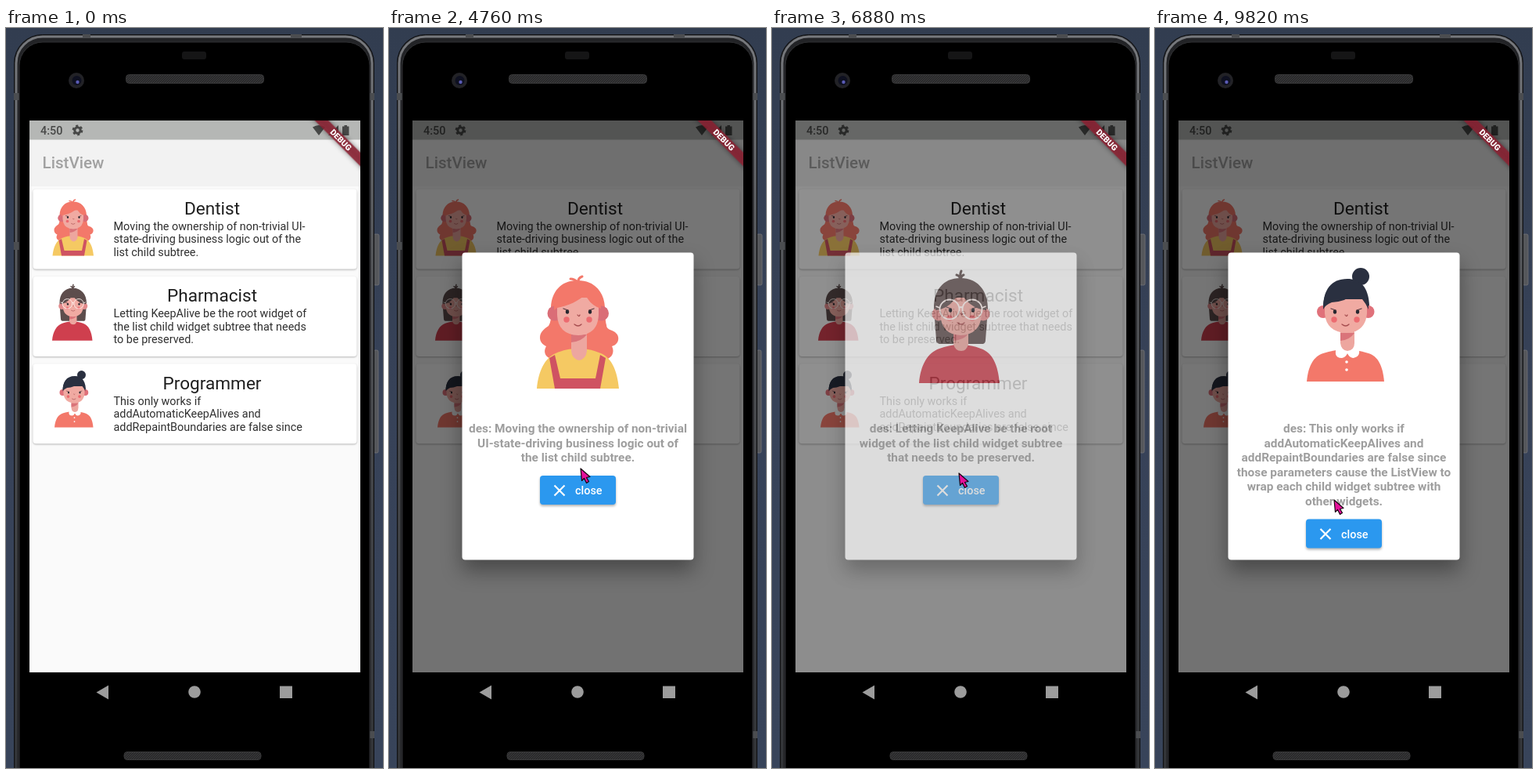
Write an HTML page that moves like this. It is 482x944 px and loops after 9.85 s.

```html
<!DOCTYPE html>
<html lang="en">
<head>
<meta charset="utf-8">
<title>ListView</title>
<style>
  html, body { margin: 0; height: 100%; overflow: hidden; background: #364155; }
  svg { display: block; width: 482px; height: 944px; font-family: Roboto, sans-serif; }
  .mid { text-anchor: middle; }
  .name { font-size: 22.6px; fill: #1f1f1f; }
  .about { font-size: 14.4px; fill: #303030; }
  .des { font-size: 15.4px; font-weight: 700; fill: #9e9e9e; }
  .button { font-size: 14.4px; font-weight: 500; fill: #fff; }
  .card { fill: #fff; filter: drop-shadow(0 1px 1px rgba(0,0,0,.28)); }
  .sheet { fill: #fff; filter: drop-shadow(0 14px 13px rgba(0,0,0,.36)); }
  .raised { fill: #2b98ef; filter: drop-shadow(0 2px 1.5px rgba(0,0,0,.3)); }
</style>
</head>
<body>
<svg viewBox="0 0 482 944">
  <defs>
    <linearGradient id="backdrop" x2="0" y2="1">
      <stop stop-color="#323d50"/><stop offset=".5" stop-color="#374258"/><stop offset="1" stop-color="#38445a"/>
    </linearGradient>
    <linearGradient id="rim" x2="0" y2="1">
      <stop stop-color="#77797d"/><stop offset=".3" stop-color="#55575b"/><stop offset="1" stop-color="#303235"/>
    </linearGradient>
    <pattern id="mesh" width="3" height="3" patternUnits="userSpaceOnUse">
      <path fill="#29292a" d="M0 0h3v3H0z"/><path stroke="#3c3c3e" d="M0 3L3 0"/>
    </pattern>
    <clipPath id="screen"><path d="M30 118h423v704H30z"/></clipPath>

    <g id="features">
      <g fill="#26272f"><ellipse cx="228" cy="362" rx="2.2" ry="2.8"/><ellipse cx="257" cy="362" rx="2.2" ry="2.8"/></g>
      <g fill="#ec6b70"><circle cx="227" cy="372" r="3.7"/><circle cx="256" cy="372" r="3.7"/></g>
      <g fill="none" stroke="#a64e50" stroke-width="1.3" stroke-linecap="round">
        <path d="M241 366q2 3 3 0M237 378q5 4 9 0"/>
        <path stroke="#553c42" d="M223 358l6 2M262 358l-6 2"/>
      </g>
    </g>

    <g id="dentist">
      <path fill="#f3786a" d="M241 322c-22 0-33 15-34 34c0 10 1 18-3 24c-6 4-11 8-11 15c0 6 4 9 8 11c-6 11 3 18 16 17h52c13 2 21-7 16-17c9-2 10-12 6-16c-5-6-13-4-13-11c-2-7-1-15-2-23c-1-19-13-34-35-34z"/>
      <path fill="none" stroke="#f3786a" stroke-width="3" stroke-linecap="round" d="M242 325q-5-5-10-5M242 325q-1-6 5-8"/>
      <path fill="#f5c963" d="M189 460c2-22 10-39 24-45c9-4 18-6 29-6s20 2 29 6c14 6 21 23 23 45z"/>
      <path fill="#cf5362" d="M205 421l7-4l7 30h45l6-30l7 4l-7 39h-58z"/>
      <path fill="#eda69f" d="M233 385h20v27q-1 10-10 12q-9-2-10-12z"/>
      <path fill="#da747a" d="M233 391h20q-7 9-20 10z"/>
      <g fill="#da6d77"><circle cx="212" cy="364" r="9.5"/><circle cx="271.500" cy="364" r="9.500"/></g>
      <path fill="#f0aaa2" d="M215 344h53v22q-1 25-26 26q-26-1-27-26z"/>
      <path fill="#f3786a" d="M211 360c0-23 11-35 31-35s29 13 29 33c-9-3-16-9-20-18c-8 8-21 14-36 17z"/>
      <use href="#features"/>
    </g>

    <g id="pharmacist">
      <path fill="#5d4d4c" d="M241 319c-23 0-34 16-34 39l3 40q0 4 4 5h56q3-1 3-5l3-40c0-23-13-39-35-39z"/>
      <path fill="none" stroke="#5d4d4c" stroke-width="3" stroke-linecap="round" d="M241 321q-1-5-5-6M241 321q-1-7 1-11M241 321q1-5 4-6"/>
      <path fill="#cf3f4e" d="M188 453c2-23 11-39 26-44c8-3 16-5 26-5s19 2 27 5c15 5 22 21 24 44z"/>
      <path fill="#eda69f" d="M232 384h19v19q-2 9-9 9q-8 0-10-9z"/>
      <path fill="#da747a" d="M232 390h19q-6 8-19 9z"/>
      <g fill="#e38b8c"><circle cx="213" cy="365" r="8.500"/><circle cx="270" cy="365" r="8.500"/></g>
      <path fill="#f0aaa2" d="M215 344h53v20q-1 27-27 28q-25-1-26-28z"/>
      <path fill="#5d4d4c" d="M209 360c-2-24 10-37 32-37c23 0 34 13 33 37c-14-1-28-10-34-27c-5 16-17 26-31 27z"/>
      <use href="#features" y="-2"/>
      <g fill="none" stroke="#fff3f0" stroke-width="1.800"><circle cx="227" cy="359" r="12.500"/><circle cx="256" cy="359" r="12.500"/><path d="M239.500 357q2-2 4 0M214.500 357l-5-2M268.500 357l5-2"/></g>
    </g>

    <g id="programmer">
      <circle cx="263" cy="317" r="11" fill="#2a3040"/>
      <path fill="#2a3040" d="M215 362c-1-27 9-42 31-42c20 0 29 15 28 42z"/>
      <path fill="#f3786a" d="M194 451c2-21 9-32 21-36c9-3 19-5 29-5s20 2 29 5c12 4 18 15 20 36z"/>
      <path fill="#eda69f" d="M237 383h18v29q-8 7-18 0z"/>
      <path fill="#da747a" d="M237 389h18q-6 9-18 10z"/>
      <g fill="#e0717a"><circle cx="215" cy="362" r="8"/><circle cx="272.500" cy="362" r="8"/></g>
      <path fill="#f0aaa2" d="M217 346h54v18q-2 24-26 25q-26-1-28-25z"/>
      <path fill="#2a3040" d="M215 359c0-24 9-36 30-36c19 0 28 12 28 36q-3-7-8-13q-6-2-10-8q-10 11-29 12q-8 3-11 9z"/>
      <use href="#features" x="2"/>
      <g fill="#fff"><path d="M237 402q-7 4-6 14q1 5 8 5q5-1 7-6q2 5 7 6q7-1 8-6q1-9-6-13q0 9-9 10q-8-1-9-10z"/><circle cx="245" cy="426" r="1.800"/><circle cx="245" cy="436" r="1.800"/></g>
    </g>
  </defs>

  <path fill="url(#backdrop)" d="M0 0h482v944H0z"/>
  <g fill="#55575b" stroke="#717377" stroke-width=".8">
    <rect x="470" y="263" width="7" height="65" rx="2"/><rect x="470" y="411" width="6" height="131" rx="2"/>
  </g>
  <rect x="10.500" y="8.500" width="460" height="1000" rx="36" fill="#222326" stroke="#111214"/>
  <rect x="13" y="11" width="455" height="1000" rx="34" fill="none" stroke="url(#rim)" stroke-width="3"/>
  <path fill="#4b4d50" d="M10 83h7v9h-7zM10 273h7v10h-7zM464 83h7v9h-7zM464 897h7v9h-7zM98 8h10v4H98zM364 8h14v4h-14z"/>
  <rect x="17" y="18" width="448" height="990" rx="30" fill="#000" stroke="#303134"/>
  <rect x="225" y="30" width="31" height="10" rx="3" fill="#151516"/>
  <g fill="url(#mesh)" stroke="#39393a"><rect x="153.500" y="59.500" width="176" height="11" rx="4"/><rect x="151" y="923.500" width="175" height="10" rx="4"/></g>
  <circle cx="90" cy="67" r="10" fill="#222226"/><circle cx="90.500" cy="67" r="6" fill="#0e1020"/><circle cx="91.500" cy="69" r="2.200" fill="#5a5bb5"/>
  <g fill="#9c9c9c"><path d="M115.500 847.500L131 838.500v18zM350 839.500h16v15.500h-16z"/><circle cx="241" cy="847" r="7.800"/></g>

  <g clip-path="url(#screen)">
    <path fill="#fafafa" d="M30 118h423v704H30z"/>
    <path fill="#f2f2f2" d="M30 142h423v60H30z"/>
    <path fill="#b5b7b5" d="M30 118h423v24.500H30z"/>
    <g fill="#474847">
      <text x="44" y="136" font-size="14.400" font-weight="500">4:50</text>
      <circle cx="91.500" cy="130.500" r="3.700" fill="none" stroke="#474847" stroke-width="3"/>
      <circle cx="91.500" cy="130.500" r="5.700" fill="none" stroke="#474847" stroke-width="2.400" stroke-dasharray="3 2.970"/>
      <path d="M392 126.500q8-5 16 0l-8 10.500zM425 124v13h-13zM430 125.500h2.500v-1.500h3.500v1.500h2.500V137H430z"/>
    </g>
    <text x="46.500" y="179" font-size="20.600" font-weight="500" fill="#a1a1a1">ListView</text>
    <g id="list"></g>
    <path id="barrier" opacity="0" d="M30 118h423v704H30z"/>
    <g id="dialogs"></g>
    <g transform="translate(453 118) rotate(45)">
      <path fill="#8d2233" fill-opacity=".87" d="M-60 28.800H60v12.400H-60z" style="filter:drop-shadow(0 0 3px rgba(0,0,0,.5))"/>
      <text class="mid" y="38.700" font-size="10.500" font-weight="900" fill="#fff">DEBUG</text>
    </g>
  </g>
  <path id="cursor" fill="#e5109a" stroke="#17050f" stroke-width="1.200" stroke-linejoin="round" d="M0 0L1.500 15.500L4.500 12.500L7.500 18.500L10.500 16.500L7.500 11.500L12 10.500Z"/>
</svg>
<script>
const LOOP = 9850, FADE = 150, PRESS = 120;

const jobs = [
  { name: 'Dentist', open: 4480, close: 5170,
    about: ['Moving the ownership of non-trivial UI-', 'state-driving business logic out of the', 'list child subtree.'],
    des: ['des: Moving the ownership of non-trivial', 'UI-state-driving business logic out of', 'the list child subtree.'] },
  { name: 'Pharmacist', open: 6120, close: 6808,
    about: ['Letting KeepAlive be the root widget of', 'the list child widget subtree that needs', 'to be preserved.'],
    des: ['des: Letting KeepAlive be the root', 'widget of the list child widget subtree', 'that needs to be preserved.'] },
  { name: 'Programmer', open: 7480, close: Infinity,
    about: ['This only works if', 'addAutomaticKeepAlives and', 'addRepaintBoundaries are false since'],
    des: ['des: This only works if', 'addAutomaticKeepAlives and', 'addRepaintBoundaries are false since',
      'those parameters cause the ListView to', 'wrap each child widget subtree with', 'other widgets.'] },
];

// Pointer stops: time, x, y
const stops = [
  [3820, 484, 420], [4250, 264, 262], [4450, 262, 264], [4760, 245, 562],
  [5060, 243, 588], [5150, 244, 588], [5300, 248, 573], [5800, 252, 376], [6100, 252, 374],
  [6500, 241, 585], [6800, 239, 581], [6880, 239, 568], [7250, 246, 482], [7450, 246, 480],
  [8000, 239, 561], [8800, 237, 574], [9820, 229, 602],
];

const $ = id => document.getElementById(id);
const clamp = v => Math.min(1, Math.max(0, v));
const lines = (rows, cls, x, y, pitch) =>
  rows.map((row, i) => `<text class="${cls}" x="${x}" y="${y + i * pitch}">${row}</text>`).join('');

function bezier(x1, y1, x2, y2) {
  const at = (s, a, b) => 3 * s * (1 - s) ** 2 * a + 3 * s * s * (1 - s) * b + s ** 3;
  return x => {
    let low = 0, high = 1;
    for (let i = 0; i < 16; i++) {
      const s = (low + high) / 2;
      if (at(s, x1, x2) < x) low = s; else high = s;
    }
    return x <= 0 ? 0 : at(high, y1, y2);
  };
}
const ease = bezier(0.25, 0.1, 0.25, 1), easeOut = bezier(0, 0, 0.58, 1);

function card({ name, about }, i) {
  const y = 111.4 * i;
  return `<rect class="card" x="34.500" y="${205.5 + y}" width="414" height="102" rx="4"/>
    <use href="#${name.toLowerCase()}" transform="translate(-35 ${60.5 + 111.8 * i}) scale(.5)"/>
    <text class="name mid" x="263.500" y="${238 + y}">${name}</text>
    ${lines(about, 'about', 137.5, 258 + y, 16.46)}`;
}

function dialog({ name, des }) {
  const shift = (des.length - 3) * 18.52;
  return `<g opacity="0">
    <rect class="sheet" x="93.500" y="286.500" width="296" height="392" rx="4"/>
    <use href="#${name.toLowerCase()}"/>
    ${lines(des, 'des mid', 241.5, 516, 18.52)}
    <g transform="translate(0 ${shift})">
      <rect class="raised" x="193" y="571" width="97" height="37" rx="4"/>
      <rect class="splash" x="193" y="571" width="97" height="37" rx="4" fill="#fff" opacity="0"/>
      <path stroke="#fff" stroke-width="2.200" d="M211.500 583.500l13 13M224.500 583.500l-13 13"/>
      <text class="button" x="238" y="595">close</text>
    </g></g>`;
}

$('list').innerHTML = jobs.map(card).join('');
$('dialogs').innerHTML = jobs.map(dialog).join('');
const sheets = [...$('dialogs').children];
const splashes = document.querySelectorAll('.splash');

function pointer(t) {
  const next = stops.findIndex(stop => stop[0] > t);
  if (next < 0) return stops.at(-1).slice(1);
  const [t0, x0, y0] = stops[next - 1], [t1, x1, y1] = stops[next];
  const u = (t - t0) / (t1 - t0), k = u * u * (3 - 2 * u);
  return [x0 + (x1 - x0) * k, y0 + (y1 - y0) * k];
}

function draw(t) {
  let dim = 0;
  jobs.forEach(({ open, close }, i) => {
    const shown = clamp((t - open) / FADE) - clamp((t - close) / FADE);
    sheets[i].setAttribute('opacity', easeOut(shown));
    splashes[i].setAttribute('opacity', 0.2 * clamp((t - close + PRESS) / PRESS));
    dim = Math.max(dim, ease(shown));
  });
  $('barrier').setAttribute('opacity', 0.54 * dim);

  const visible = t >= stops[0][0];
  $('cursor').setAttribute('visibility', visible ? 'visible' : 'hidden');
  if (visible) $('cursor').setAttribute('transform', `translate(${pointer(t)})`);
}

const start = performance.now();
function tick() {
  draw((performance.now() - start) % LOOP);
  requestAnimationFrame(tick);
}
tick();
</script>
</body>
</html>
```
